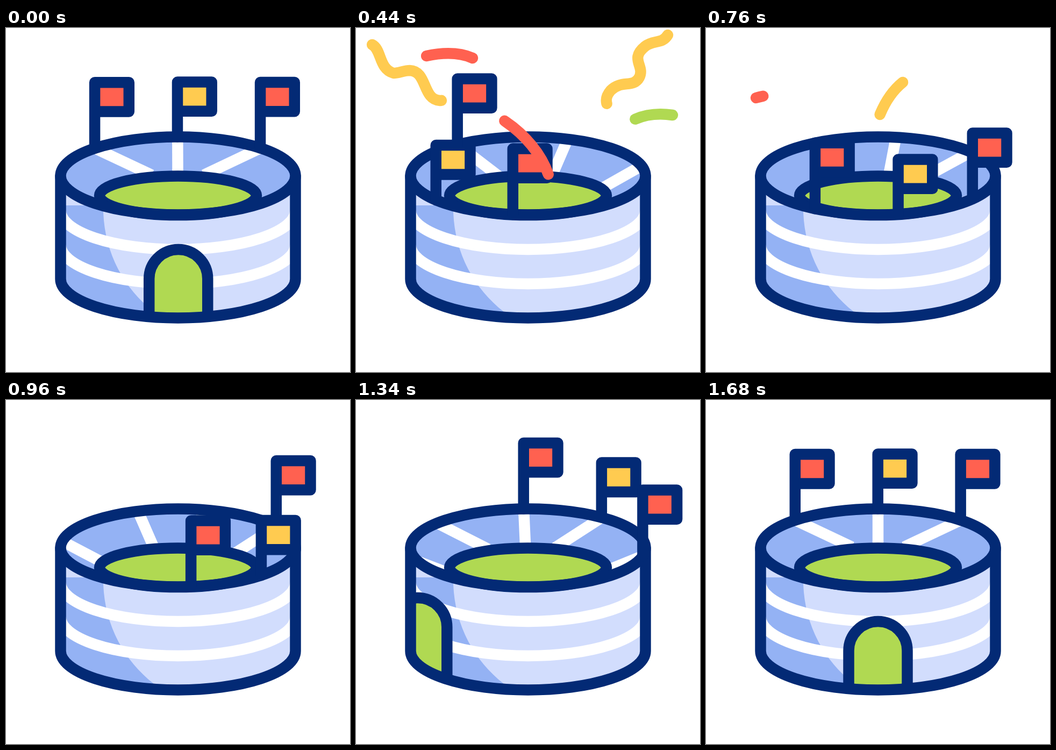
An HTML page with a canvas for the animation above (2400 ms loop, 640 by 640 pixels).

```html
<!DOCTYPE html>
<html lang="en">
<head>
<meta charset="utf-8">
<title>Stadium</title>
<style>
html, body { margin: 0; width: 100%; height: 100%; overflow: hidden; background: #fff; }
canvas { display: block; }
</style>
</head>
<body>
<canvas id="stage" width="640" height="640"></canvas>
<script>
const ctx = document.getElementById('stage').getContext('2d');
const { PI, sin, cos, exp, abs, min, max, atan2 } = Math;
const LOOP = 2400, SPIN = 1680;
const LINE = 20.5, CX = 320, RX = 218.5, RY = 72.5, RIM_Y = 275;
const NAVY = '#032a75', MID = '#94b2f4', PALE = '#d2ddfd', GREEN = '#b0d952',
      RED = '#ff6150', YELLOW = '#ffcb50';

// Rim as a path running from the back over the left side
const rim = document.createElementNS('http://www.w3.org/2000/svg', 'path');
rim.setAttribute('d', 'M320 202.5A218.5 72.5 0 0 0 320 347.5A218.5 72.5 0 0 0 320 202.5');
const RIM = rim.getTotalLength();

const body = new Path2D('M101.5 275V467A218.5 72.5 0 0 0 538.5 467V275Z');
const shade = new Path2D('M181 330V343C184 420 220 485 275 528L300 548H90V330Z');

// Riders go once round the rim; lead and sway shape their easing
const rider = (start, lead, sway, extra) => ({ start, lead, sway, ...extra });
const flags = [
  rider(156, 0.074, -0.006, { pole: 122.5, color: RED }),
  rider(0, 0.089, -0.007, { pole: 102, color: YELLOW }),
  rider(-156, 0.099, -0.039, { pole: 122.5, color: RED })
];
const aisles = [...flags, rider(-340, 0.015, 0), rider(-520, 0.045, 0.01), rider(-640, 0.03, -0.02)];
const door = rider(0, 0.0256, 0.0256);

// Streamer paths start at the outer end; the stroke runs in from the far end
const streamer = (color, len, timing, d) => ({ color, len, ...timing, path: new Path2D(d) });
const burst = { start: 0, headTime: 345, tailDelay: 0, tailTime: 750 };
const late = start => ({ start, headTime: 425, tailDelay: 170, tailTime: 335 });
const wave = 'c10 0 19-5 30-5c33 1 23 54 56 56';
const streamers = [
  streamer(YELLOW, 453, burst, 'M30 31C48 40 42 76 70 84' + wave + wave + wave),
  streamer(YELLOW, 484, burst, 'M580 13C570 30 553 22 538 34C508 58 538 70 527 92' +
    'C516 112 494 96 474 116C453 140 480 150 468 170C455 195 432 178 415 197C395 215 400 245 370 265'),
  streamer(GREEN, 172, burst, 'M589 162Q528 153 487 191Q445 235 425 290'),
  streamer(RED, 212, burst, 'M131 52Q216 34 254 86Q292 138 320 270'),
  streamer(RED, 327, late(270), 'M93 130C155 112 222 130 278 174C315 199 345 235 358 273'),
  streamer(YELLOW, 244, late(440), 'M418 72Q390 82 366 101Q340 122 324 160Q306 203 306 268')
];

const clamp = x => max(0, min(1, x));
const travel = (r, p) => RIM * (p + r.lead * sin(PI * p) + r.sway * sin(2 * PI * p));
const place = (r, p) => rim.getPointAtLength((r.start + travel(r, p) + RIM) % RIM);

function ellipse(y, rx, ry, end = 2 * PI) {
  ctx.beginPath();
  ctx.ellipse(CX, y, rx, ry, 0, 0, end);
}

function fill(color, path) {
  ctx.fillStyle = color;
  path ? ctx.fill(path) : ctx.fill();
}

function stroke(color, path) {
  ctx.strokeStyle = color;
  path ? ctx.stroke(path) : ctx.stroke();
}

function drawDoor(p) {
  const d = travel(door, p), dx = d < RIM / 2 ? d : d - RIM;
  const x = CX + dx, y = 466.5 - dx * dx / 960;
  ctx.beginPath();
  ctx.moveTo(x - 54.5, 600);
  ctx.arc(x, y, 54.5, PI, 0);
  ctx.lineTo(x + 54.5, 600);
  fill(GREEN);
  stroke(NAVY);
}

function drawBody(p) {
  ctx.save();
  ctx.clip(body);
  fill(PALE, body);
  fill(MID, shade);
  ctx.lineCap = 'butt';
  for (const y of [339.5, 403.5]) {
    ellipse(y, RX, RY, PI);
    stroke('#fff');
  }
  drawDoor(p);
  ctx.restore();
  stroke(NAVY, body);
}

function drawAisle(aisle, p) {
  const { x, y } = place(aisle, p);
  const a = atan2((x - CX) / RX, (RIM_Y - y) / RY), deg = abs(a) * 180 / PI;
  if (deg > 130) return; // behind the front wall
  // Inner ends pull together near the diagonals
  const inner = Math.sign(a) * (0.9 * deg - 18.5 * exp(-(((deg - 45) / 10) ** 2))) * PI / 180;
  ctx.beginPath();
  ctx.moveTo(x, y);
  ctx.lineTo(CX + 156 * sin(inner), 312 - 46.5 * cos(inner));
  stroke('#fff');
}

function drawBowl(p) {
  ctx.save();
  ellipse(RIM_Y, RX, RY);
  fill(MID);
  ctx.clip();
  ctx.lineCap = 'square';
  aisles.forEach(a => drawAisle(a, p));
  ctx.restore();
  ellipse(311.8, 146, 36.3);
  fill(GREEN);
  stroke(NAVY);
  ellipse(RIM_Y, RX, RY);
  stroke(NAVY);
}

function drawFlag(flag, p) {
  const { x, y } = place(flag, p), top = y - flag.pole;
  ctx.beginPath();
  ctx.rect(x - 0.3, top, 63.7, 54.3);
  fill(flag.color);
  ctx.moveTo(x - 0.3, top);
  ctx.lineTo(x - 0.3, y);
  stroke(NAVY);
}

function drawStreamer(s, t) {
  const age = t - s.start;
  const head = s.len * (1 - clamp(age / s.headTime));
  const size = s.len * (1 - clamp((age - s.tailDelay) / s.tailTime)) - head;
  if (size < 0.5) return;
  ctx.setLineDash([size, 9999]);
  ctx.lineDashOffset = -head;
  stroke(s.color, s.path);
  ctx.setLineDash([]);
}

function draw(now) {
  const t = now % LOOP, p = min(t / SPIN, 1);
  ctx.fillStyle = '#fff';
  ctx.fillRect(0, 0, 640, 640);
  ctx.lineWidth = LINE;
  ctx.lineCap = ctx.lineJoin = 'round';
  drawBody(p);
  drawBowl(p);
  flags.forEach(f => drawFlag(f, p));
  streamers.forEach(s => drawStreamer(s, t));
}

const begin = performance.now();
function tick() {
  draw(performance.now() - begin);
  requestAnimationFrame(tick);
}
tick();
</script>
</body>
</html>
```
